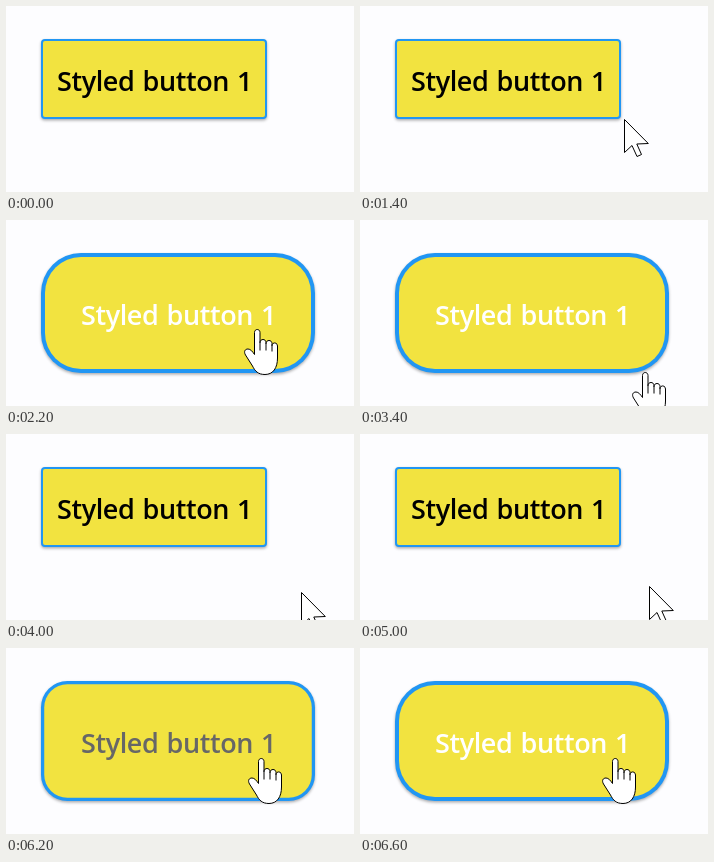
Write an HTML page with a canvas that moves like this. It is 348 px wide and 186 px high and loops after 8 s.

```html
<!DOCTYPE html>
<html lang="en">
<head>
<meta charset="utf-8">
<title>Styled button</title>
<style>
html, body { margin: 0; width: 100%; height: 100%; overflow: hidden; background: #fdfdff; }
canvas { display: block; }
</style>
</head>
<body>
<canvas id="stage" width="348" height="186"></canvas>
<script>
const ctx = document.getElementById('stage').getContext('2d');
const LOOP = 8000, STEP = 200;
const LEFT = 35, TOP = 33;

// time, pointer kind, left, top
const pointerTrack = [
  [800, 'arrow', 274, 137], [1000, 'arrow', 276, 124],
  [1200, 'arrow', 273, 121], [1400, 'arrow', 264, 113],
  [1600, 'hand', 238, 109], [2800, 'hand', 245, 117],
  [3000, 'hand', 260, 136], [3200, 'hand', 264, 145],
  [3400, 'hand', 272, 152], [3600, 'arrow', 295, 158],
  [5000, 'arrow', 289, 152], [5400, 'arrow', 271, 127],
  [5600, 'arrow', 260, 114], [5800, 'arrow', 259, 113],
  [6000, 'hand', 242, 110]
];

// The size jumps with the hover state; shape and text colour ease over.
const hoverTrack = [
  { start: 1500, length: 600, on: true },
  { start: 3500, length: 500, on: false },
  { start: 5950, length: 620, on: true }
];

const pointers = {
  arrow: new Path2D('M.5 .5V33.5L8 26.5L13 37.5L17.5 35.5L12.8 25L24.3 24.5Z'),
  hand: new Path2D(
    'M10.5 25.5V3.5C10.5 -.5 16 -.5 16 3.5V13.5C16 9.5 22 9.5 22 13.5V14.5' +
    'C22 10.5 28 10.5 28 14.5V16.5C28 13 33.5 13 33.5 17V29' +
    'C33.5 39 29 45.5 21 45.5C14 45.5 11 42 8.5 37L1.5 26' +
    'C-.5 22.5 1 20 4 20C6.5 20 8.5 22.5 10.5 25.5Z')
};
const knuckles = new Path2D('M16 13V21.5M22 14V21.5M28 16V22.5');

const mix = (a, b, p) => a + (b - a) * p;

// Cubic bezier (0.4, 0, 0.2, 1), solved for x by bisection.
function ease(x) {
  const bezier = (a, b, u) => 3 * a * u * (1 - u) ** 2 + 3 * b * u * u * (1 - u) + u ** 3;
  let low = 0, high = 1;
  for (let i = 0; i < 20; i++) {
    const mid = (low + high) / 2;
    if (bezier(0.4, 0.2, mid) < x) low = mid; else high = mid;
  }
  return bezier(0, 1, (low + high) / 2);
}

function fillRound(x, y, w, h, r, color) {
  ctx.beginPath();
  ctx.roundRect(x, y, w, h, r);
  ctx.fillStyle = color;
  ctx.fill();
}

function drawButton(time) {
  const change = hoverTrack.filter(c => c.start <= time).pop();
  const hovered = change ? change.on : false;
  const progress = change ? Math.min(1, (time - change.start) / change.length) : 1;
  const toHover = p => hovered ? p : 1 - p;
  const shape = toHover(ease(progress));
  const padding = hovered ? 40 : 16;
  const width = 194 + 2 * padding;
  const height = hovered ? 120 : 80;
  const border = mix(2, 4, shape), radius = mix(4, 40, shape);

  ctx.save();
  ctx.shadowColor = 'rgba(0,0,0,.32)';
  ctx.shadowBlur = 3;
  ctx.shadowOffsetY = 1.5;
  fillRound(LEFT, TOP, width, height, radius, '#2196f3');
  ctx.restore();
  fillRound(LEFT + border, TOP + border, width - 2 * border, height - 2 * border,
    radius - border, '#f2e340');

  const gray = Math.round(255 * toHover(progress));
  ctx.fillStyle = `rgb(${gray},${gray},${gray})`;
  ctx.font = '600 27px "Open Sans", "Noto Sans", sans-serif';
  ctx.letterSpacing = '-0.4px';
  ctx.wordSpacing = '1.5px';
  ctx.fillText('Styled button 1', LEFT + padding, TOP + height / 2 + 12);
}

function drawPointer(time) {
  const place = pointerTrack.filter(p => p[0] <= time).pop();
  if (!place) return;
  const [, kind, x, y] = place;
  ctx.save();
  ctx.translate(x, y);
  ctx.fillStyle = '#fff';
  ctx.strokeStyle = '#000';
  ctx.lineWidth = 1;
  ctx.fill(pointers[kind]);
  ctx.stroke(pointers[kind]);
  if (kind === 'hand') ctx.stroke(knuckles);
  ctx.restore();
}

function draw() {
  const time = Math.floor(performance.now() % LOOP / STEP) * STEP;
  ctx.fillStyle = '#fdfdff';
  ctx.fillRect(0, 0, 348, 186);
  drawButton(time);
  drawPointer(time);
  requestAnimationFrame(draw);
}
draw();
</script>
</body>
</html>
```
